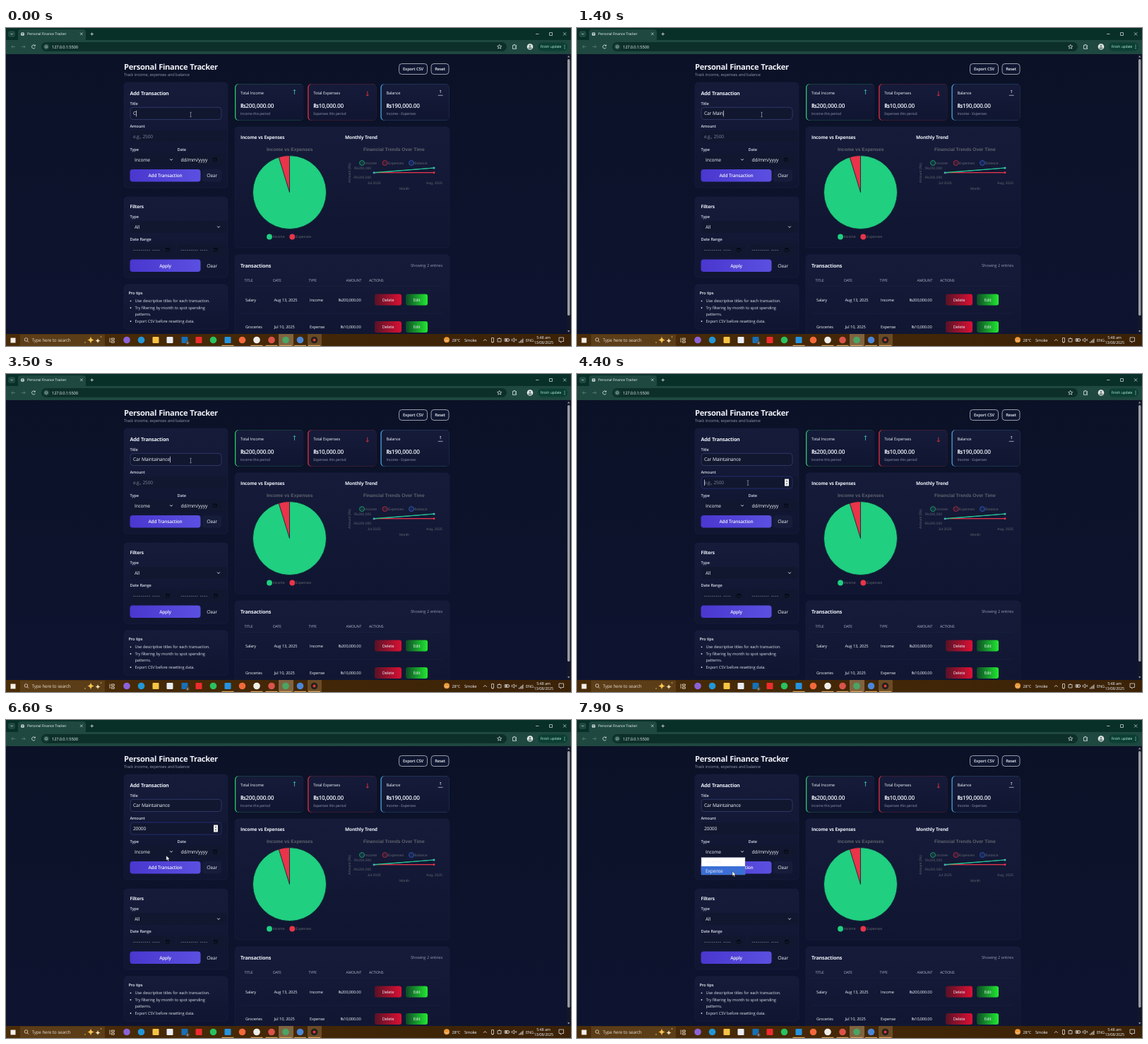
Write an HTML page that moves like this. It is 800 px wide and 450 px high and loops after 8000 ms.

```html
<!DOCTYPE html>
<html lang="en">
<head>
<meta charset="utf-8">
<title>Personal Finance Tracker</title>
<style>
  html, body { margin: 0; width: 100%; height: 100%; overflow: hidden; background: #0d1329; }
  svg { display: block; width: 800px; height: 450px; text-rendering: geometricPrecision; }
  text { font-family: "Open Sans", "Noto Sans", sans-serif; letter-spacing: -.03em; word-spacing: .05em; white-space: pre; }
  .chart text { font-family: "Liberation Sans", Arial, sans-serif; letter-spacing: 0; word-spacing: 0; }
</style>
</head>
<body>
<svg id="stage" viewBox="0 0 800 450" xmlns="http://www.w3.org/2000/svg"></svg>
<script>
const LOOP = 8000;
const WHITE = '#eef0f8', MUTED = '#9298ae', GREY = '#62656f', MINT = '#dce9e6';
const GREEN = '#20cf80', RED = '#e9344a', BLUE = '#3d8fe0';

// Drawing helpers; text is centred vertically on its capitals.
const rect = (x, y, w, h, fill, r = 0, extra = '') =>
  `<rect x="${x}" y="${y}" width="${w}" height="${h}" rx="${r}" fill="${fill}" ${extra}/>`;
const dot = (x, y, r, fill, extra = '') =>
  `<circle cx="${x}" cy="${y}" r="${r}" fill="${fill}" ${extra}/>`;
const path = (d, stroke, w = 0.8, extra = '') =>
  `<path d="${d}" fill="none" stroke="${stroke}" stroke-width="${w}" ${extra}/>`;
const text = (x, y, s, size, fill = WHITE, weight = 400, anchor = 'start', extra = '') =>
  `<text x="${x}" y="${(y + size * 0.357).toFixed(2)}" font-size="${size}" fill="${fill}" ` +
  `font-weight="${weight}" text-anchor="${anchor}" ${extra}>${s}</text>`;
const gradient = (id, from, to, down = 0) =>
  `<linearGradient id="${id}" x2="${1 - down}" y2="${down}"><stop stop-color="${from}"/>` +
  `<stop offset="1" stop-color="${to}"/></linearGradient>`;
const stroke = (c, w = 0.7) => `stroke="${c}" stroke-width="${w}"`;
const panel = (x, y, w, h) => rect(x, y, w, h, 'url(#panel)', 5, stroke('#1a2142', 0.6));
const field = (x, y, w, h) => rect(x, y, w, h, '#11172f', 4);
const chevron = (x, y) => path(`M${x - 1.8} ${y - 1}l1.8 1.9 1.8 -1.9`, WHITE, 0.9);

function browser() {
  let s = rect(0, 0, 800, 18, '#082f28') + rect(0, 17, 800, 20, '#1e4840');
  s += rect(17, 2, 96, 17, '#1e4840', 4);
  s += rect(3, 4, 10, 9, '#1e4840', 3) + path('M6.5 7.6l1.7 1.7 1.7 -1.7', MINT);
  s += dot(23.5, 8.5, 2.6, '#c3d2ce') + path('M21 8h5M23.5 6v5', '#45665e', 0.5);
  s += text(30, 8.5, 'Personal Finance Tracker', 5.05, '#eef5f3', 500);
  s += path('M105 6.5l3.6 3.6M108.6 6.5l-3.6 3.6', MINT, 0.7);
  s += path('M119.5 8.5h4.4M121.7 6.3v4.4', MINT);
  s += path('M750 8.5h4.5M769.5 6.5h4v4h-4zM789 6.3l4.2 4.2M793.2 6.3l-4.2 4.2', MINT, 0.7);
  s += path('M13 26.5h-5M10 24.3l-2.2 2.2 2.2 2.2M22 26.5h5M25 24.3l2.2 2.2 -2.2 2.2', '#5f8078');
  s += path('M41 25a2.5 2.5 0 1 0 .3 2.6M41.3 23.6v1.7h-1.7', MINT);
  s += rect(50, 20, 659, 13, '#0d2f2a', 6.5) + dot(57, 26.5, 4.3, '#1e4840');
  s += dot(57, 26.5, 1.9, 'none', stroke(MINT, 0.6)) + path('M57 26v1.5', MINT, 0.6);
  s += text(65, 26.5, '127.0.0.1:5500', 5.8, '#eef5f3');
  s += path('M698.7 23.4l.9 2 2.2 .2 -1.7 1.4 .6 2.2 -2 -1.2 -2 1.2 .6 -2.2 -1.7 -1.4 2.2 -.2z', MINT, 0.7);
  s += path('M717.5 24.5h1.5v-1h1.5v1h2v2h-1.3v1.2h1.3v1.8h-5z', MINT);
  s += dot(742, 26.5, 4.3, '#e3eae8') + dot(742, 25.3, 1.4, '#6d857e') + rect(739.5, 27.3, 5, 2.5, '#6d857e', 1.2);
  s += rect(753, 20.5, 42, 12, '#0c3f34', 6) + text(756.5, 26.5, 'Finish update', 5, '#b7efd9', 500);
  for (const y of [24.3, 26.5, 28.7]) s += dot(791, y, 0.6, '#b7efd9');
  return s;
}

function forms() {
  let s = text(167, 54.5, 'Personal Finance Tracker', 11.2, WHITE, 700);
  s += text(167, 65.5, 'Track income, expenses and balance', 5.75, MUTED);
  for (const [x, w, name] of [[556.5, 40, 'Export CSV'], [602, 25, 'Reset']])
    s += rect(x, 50.5, w, 15, '#0f1630', 4, stroke('#d5d8e4')) + text(x + w / 2, 58, name, 5.8, WHITE, 600, 'middle');

  s += panel(167, 77, 147, 149) + panel(167, 239, 147, 114) + panel(167, 363, 147, 63);
  s += text(175.5, 92, 'Add Transaction', 7.2, WHITE, 700);
  const labels = [['Title', 175.5, 107], ['Amount', 175.5, 139.3], ['Type', 175.5, 171.5], ['Date', 242.5, 171.5],
    ['Type', 175.5, 267], ['Date Range', 175.5, 299]];
  for (const [name, x, y] of labels) s += text(x, y, name, 5.7, '#d6d9e6', 600);
  s += rect(176, 112.3, 129, 17.2, '#11172f', 4, stroke('#3a447a'));
  s += field(176, 145, 137, 17) + field(176, 177.5, 63, 17) + field(243, 177.5, 70, 17);
  s += text(182, 186.3, 'Income', 6.67, WHITE, 500) + chevron(234, 186.3);
  s += text(247.5, 186.3, 'dd/mm/yyyy', 6.8, WHITE, 500);

  s += text(175.5, 252.8, 'Filters', 6.6, WHITE, 700);
  s += field(176, 273, 137, 17) + text(182, 281.5, 'All', 6.67, WHITE, 500) + chevron(301, 281.5);
  s += field(176, 305, 63, 17) + field(243, 305, 70, 17);
  for (const x of [180, 247.5]) s += text(x, 314, '--------- ----', 6.67, '#b9bdcc', 400, 'start', 'style="letter-spacing:.09em"');
  for (const [x, y] of [[296, 186], [229, 313.5], [297, 313.5]])
    s += rect(x - 2.3, y - 2, 4.6, 4.5, 'none', 0.5, stroke('#04060e', 0.8)) + path(`M${x - 2.3} ${y - 1}h4.6`, '#04060e', 1);

  s += rect(278, 200, 27, 17.5, '#161d3b', 4);
  for (const [y, name] of [[200, 'Add Transaction'], [327.5, 'Apply']]) {
    s += rect(175.5, y, 100, 17.5, 'url(#violet)', 4) + text(225.5, y + 8.9, name, 6.5, WHITE, 600, 'middle');
    s += text(291.5, y + 8.9, 'Clear', 6.5, WHITE, 500, 'middle');
  }

  s += text(173.5, 375, 'Pro tips', 5.7, WHITE, 600);
  const tips = [[386.3, 'Use descriptive titles for each transaction.', 1], [396, 'Try filtering by month to spot spending', 1],
    [405, 'patterns.', 0], [415, 'Export CSV before resetting data.', 1]];
  for (const [y, line, bullet] of tips)
    s += text(182.5, y, line, 5.77, '#d8dbe7') + (bullet ? dot(176.5, y, 0.9, '#d8dbe7') : '');
  return s;
}

function cards() {
  const list = [['Total Income', '₨200,000.00', 'Income this period', '#2ac96f', 324],
    ['Total Expenses', '₨10,000.00', 'Expenses this period', '#e22f40', 427.2],
    ['Balance', '₨190,000.00', 'Income - Expenses', '#4aa3df', 530.4]];
  let s = '';
  for (const [name, sum, note, color, x] of list) {
    s += rect(x, 79.3, 97, 51.5, color, 5) + rect(x + 1.3, 79.3, 96, 51.5, 'url(#panel)', 5);
    s += text(x + 8, 91.7, name, 5.8) + text(x + 8, 109.7, sum, 8.3, WHITE, 600);
    s += text(x + 8, 120.7, note, 5.05, MUTED);
  }
  s += path('M408.5 94v-6.5M406.8 89l1.7 -1.8 1.7 1.8', '#35b8b4', 0.9);
  s += path('M511.8 89.5v6.5M510 94.3l1.8 1.9 1.8 -1.9', '#f0303c', 0.9);
  s += path('M615.2 88v4M614.3 89l.9 -1 .9 1M611.8 95.3h6.8', '#d9dbe6', 0.7);
  return s;
}

function charts() {
  let s = panel(324, 140, 304, 171);
  s += text(332, 154.5, 'Income vs Expenses', 6.6, WHITE, 700) + text(480, 154.5, 'Monthly Trend', 6.6, WHITE, 700);
  s += '<g class="chart">';
  s += text(401.7, 172, 'Income vs Expenses', 6.67, GREY, 700, 'middle');
  const cx = 401.5, cy = 232.5, r = 52, a = 2 * Math.PI * 10 / 210, edge = stroke('#101a30', 0.8);
  s += dot(cx, cy, r, GREEN, edge);
  s += `<path d="M${cx} ${cy}L${cx - r * Math.sin(a)} ${cy - r * Math.cos(a)}A${r} ${r} 0 0 1 ${cx} ${cy - r}z" fill="${RED}" ${edge}/>`;
  s += dot(373, 295.5, 3.9, GREEN) + text(377.5, 295.5, 'Income', 5.2, GREY);
  s += dot(405.3, 295.5, 3.9, RED) + text(410, 295.5, 'Expenses', 5.1, GREY);

  s += text(549.3, 172, 'Financial Trends Over Time', 6.67, GREY, 700, 'middle');
  const legend = [[504, 'Income', '#1c9a68'], [536.5, 'Expenses', '#b02c40'], [574, 'Balance', '#2e58b8']];
  for (const [x, name, color] of legend)
    s += dot(x, 191, 3.5, color, `fill-opacity=".2" ${stroke(color, 0.9)}`) + text(x + 4.3, 191, name, 5.1, GREY);
  s += text(517, 198, '₨200,000', 5, GREY, 400, 'end') + text(517, 211.3, '-₨200,000', 5, GREY, 400, 'end');
  s += path('M520.5 198h86M520.5 204.7h86M520.5 211.3h86M520.5 198v14M606 198v14', '#1a203b', 0.4);
  s += text(521, 219, 'Jul 2025', 5, GREY, 400, 'middle') + text(606.5, 219, 'Aug, 2025', 5, GREY, 400, 'middle');
  s += text(564, 227.6, 'Month', 5, GREY, 400, 'middle');
  s += text(0, 0, 'Amount (₨)', 5, GREY, 400, 'middle', 'transform="translate(486 205) rotate(-90)"');
  s += path('M521 205L606 198', BLUE, 1.2) + path('M521 204.6L606 204.7', RED, 1.2) + path('M521 204.7L606 198', GREEN, 1.2);
  s += dot(606, 204.7, 1.4, RED) + dot(521, 204.8, 1.5, '#45a9c0') + dot(606, 198, 1.5, '#45b9b0');
  return s + '</g>';
}

function table() {
  let s = panel(324, 321, 304, 130);
  s += text(332, 336, 'Transactions', 7.2, WHITE, 700) + text(618, 336, 'Showing 2 entries', 5.75, MUTED, 400, 'end');
  const heads = [['TITLE', 337.5], ['DATE', 378], ['TYPE', 428.5], ['AMOUNT', 481.5], ['ACTIONS', 514]];
  for (const [name, x] of heads) s += text(x, 357, name, 5.2, '#b4b8c9');
  s += path('M332 365.5h286M332 404h286', '#1b2242', 0.5);
  const rows = [[384.7, 'Salary', 'Aug 13, 2025', 'Income', '₨200,000.00'],
    [423.3, 'Groceries', 'Jul 10, 2025', 'Expense', '₨10,000.00']];
  for (const [y, title, date, type, sum] of rows) {
    s += text(339, y, title, 5.7) + text(379.5, y, date, 5.75) + text(430, y, type, 5.7);
    s += text(502.5, y, sum, 5.7, WHITE, 400, 'end');
    s += rect(522, y - 8.3, 38, 16, 'url(#delete)', 3) + text(541, y, 'Delete', 5.8, WHITE, 500, 'middle');
    s += rect(566, y - 8.3, 31, 16, 'url(#edit)', 3) + text(581.5, y, 'Edit', 5.8, WHITE, 500, 'middle');
  }
  return s;
}

function taskbar() {
  let s = rect(793.5, 37, 6.5, 396, '#12162a') + rect(795, 44, 3.5, 363, '#9a9ba3', 1.7);
  s += '<path d="M795 41.5l1.7 -2.5 1.7 2.5zM795 428l1.7 2.5 1.7 -2.5z" fill="#9a9ba3"/>';
  s += rect(0, 433, 800, 17, 'url(#bar)') + rect(6.5, 438.5, 7, 7, '#f3eee8');
  s += rect(20, 433.5, 120, 16.5, '#5b3d18') + dot(28.5, 441, 2.3, 'none', stroke('#e8ddd0', 0.8)) + path('M30.2 442.8l2 2', '#e8ddd0');
  s += text(36.5, 441.7, 'Type here to search', 6.3, '#e8ddd0');
  s += '<path d="M120 436.5q.7 4.3 5 5q-4.3 .7 -5 5q-.7 -4.3 -5 -5q4.3 -.7 5 -5z" fill="#f5c451"/>';
  s += '<path d="M130 439q.5 3 3.5 3.5q-3 .5 -3.5 3.5q-.5 -3 -3.5 -3.5q3 -.5 3.5 -3.5z" fill="#f0ddb0"/>';
  s += dot(112, 445, 0.8, '#f5c451') + dot(134.5, 437, 0.8, '#f5c451');
  s += rect(386, 433, 21, 17, '#80633f') + rect(427, 433, 20, 17, '#6b4b25');
  s += path('M147 438.5v6.5M149.3 439h4v2.2h-4zM149.3 443h4v2.2h-4z', '#f0e7dc');
  const icons = [[171, '#8b62d8', 1], [191.5, '#2196d8', 1], [212, '#f6c445', 0], [232, '#e9edf2', 0], [253, '#1670b8', 0],
    [273, '#ee2c2c', 0], [293.5, '#28c25e', 1], [314, '#2593e0', 0], [334.5, '#f2693a', 1], [355, '#f0eee9', 1],
    [376, '#d9534a', 1], [396, '#4aa564', 1], [416.5, '#4a86d8', 1], [436.5, '#23201f', 1]];
  for (const [x, color, round] of icons)
    s += round ? dot(x, 441.5, 4.8, color) : rect(x - 4.5, 437, 9, 9, color, 1);
  s += dot(436.5, 441.5, 2, '#e13a35') + dot(257, 445.5, 2.7, '#574b42') + text(257, 445.5, '6', 4, WHITE, 400, 'middle');
  for (const x of [314, 355, 376, 396, 416.5, 436.5]) s += rect(x - 8.5, 448.8, 17, 1.2, '#d9a65b');
  s += dot(624, 441.3, 4, '#ee9a3a') + path('M621.5 442.5h5', '#d8d4cc', 0.8);
  s += text(631.5, 441.5, '28°C', 5.6) + text(649, 441.5, 'Smoke', 5.8);
  s += path('M676 442.8l2.3 -2.3 2.3 2.3', WHITE);
  s += path('M687.5 438.5h3v6h-3zM689 444.5v1.5', WHITE, 0.7);
  s += path('M696 439.5h5v4.5h-5zM698.5 438v1.5', WHITE, 0.7);
  s += rect(706, 439.5, 6, 4, 'none', 0.6, stroke(WHITE)) + rect(707, 440.5, 3, 2, WHITE) + rect(712.3, 440.5, 0.8, 2, WHITE);
  s += path('M716 440.5h1.5l2 -1.7v5.5l-2 -1.7h-1.5zM720.7 440l2.4 2.8M723.1 440l-2.4 2.8', WHITE, 0.6);
  s += path('M726.5 445.5v-1.5M728.3 445.5v-3M730.1 445.5v-4.5M731.9 445.5v-6', WHITE, 0.9);
  s += text(736, 441.5, 'ENG', 5.6) + text(761, 437.6, '5:48 am', 5.5, WHITE, 400, 'middle');
  s += text(761.3, 445.5, '13/08/2025', 5.5, WHITE, 400, 'middle');
  return s + path('M783 438h6.5v5.5h-2.5l-1.5 1.7v-1.7h-2.5z', WHITE, 0.7);
}

const moving = `
  <text id="title" x="180" y="123.4" font-size="6.71" fill="${WHITE}"></text>
  <g id="focus">
    ${rect(176, 145, 129, 17, '#11172f', 4, stroke('#2a3488', 0.7))}
    ${rect(294, 148.5, 6, 10, '#f2f2f2')}
    <path d="M295.7 152.3l1.3 -1.7 1.3 1.7zM295.7 154.8l1.3 1.7 1.3 -1.7z" fill="#444"/>
  </g>
  <text id="amount" x="180" y="156.2" font-size="6.67"></text>
  ${rect(0, 0, 0.7, 8.5, WHITE, 0, 'id="caret"')}
  <g id="menu">
    ${rect(176, 194.5, 62, 24.5, '#fff', 0, stroke('#8a8fa8', 0.4))}
    ${rect(176, 207, 62, 12, '#3b6fd6', 0, 'id="pick"')}
    ${text(182, 200.8, 'Income', 6.67, '#eceef5')}${text(182, 213.3, 'Expense', 6.67, '#eceef5')}
  </g>
  <g id="beam">${path('M-1.2 -3.2h2.4M0 -3.2v6.4M-1.2 3.2h2.4', '#b4b8c8', 0.6)}</g>
  <g id="arrow"><path d="M0 0v6.8l1.6 -1.5 1.1 2.5 1.2 -.5 -1.1 -2.4h2.2z" fill="#fff" ${stroke('#111', 0.4)}/></g>`;

const stage = document.getElementById('stage');
stage.innerHTML = '<defs>' + gradient('page', '#0b1126', '#0e1430', 1) + gradient('panel', '#151b39', '#101631', 1) +
  gradient('violet', '#4a37cf', '#5a50e0') + gradient('delete', '#571226', '#dc1034') +
  gradient('edit', '#0d4a26', '#22e832') + gradient('bar', '#4a2c08', '#3b2207') + '</defs>' +
  rect(0, 36, 800, 414, 'url(#page)') + browser() + forms() + cards() + charts() + table() + taskbar() + moving;

const el = Object.fromEntries(['title', 'amount', 'focus', 'caret', 'menu', 'pick', 'beam', 'arrow']
  .map(id => [id, document.getElementById(id)]));

const TITLE = 'Car Maintainance', AMOUNT = '20000';
const titleKeys = [0, 200, 400, 600, 800, 1000, 1150, 1300, 1700, 1900, 2200, 2400, 2800, 3000, 3150, 3300];
const amountKeys = [4800, 5000, 5200, 5500, 5700];
const CLICK = 4400, OPEN = 7200, HOVER = 7500;
const mouse = [[0, 261.5, 122.5], [3600, 261.5, 122.5], [4200, 242, 154], [5900, 242, 154],
  [6500, 227, 192], [7000, 226, 191], [7300, 224, 197], [7700, 220, 214], [LOOP, 220, 214]];

const show = (node, on) => { node.style.display = on ? '' : 'none'; };

function mouseAt(t) {
  const i = mouse.findIndex(p => p[0] > t);
  const [t0, x0, y0] = mouse[i - 1], [t1, x1, y1] = mouse[i];
  const u = (t - t0) / (t1 - t0), k = u * u * (3 - 2 * u);
  return [x0 + (x1 - x0) * k, y0 + (y1 - y0) * k];
}

function draw(time) {
  const t = time % LOOP;
  const typed = keys => keys.filter(k => k <= t).length;
  const amount = AMOUNT.slice(0, typed(amountKeys));
  el.title.textContent = TITLE.slice(0, typed(titleKeys));
  el.amount.textContent = amount || 'e.g., 2500';
  el.amount.setAttribute('fill', amount ? WHITE : '#7d8399');

  const inAmount = t >= CLICK, open = t >= OPEN;
  show(el.focus, inAmount && !open);
  show(el.menu, open);
  el.pick.setAttribute('y', t >= HOVER ? 207 : 194.5);

  // The caret restarts its blink at each key press or click.
  const last = Math.max(...[...titleKeys, CLICK, ...amountKeys].filter(k => k <= t));
  const line = inAmount ? el.amount : el.title;
  const width = inAmount && !amount ? 0 : line.getComputedTextLength();
  show(el.caret, !open && (t - last) % 1000 < 500);
  el.caret.setAttribute('x', 180.2 + width);
  el.caret.setAttribute('y', inAmount ? 149.5 : 116.8);

  const [x, y] = mouseAt(t);
  const beam = y < 130 || (y > 145 && y < 162);
  show(el.beam, beam);
  show(el.arrow, !beam);
  (beam ? el.beam : el.arrow).setAttribute('transform', `translate(${x} ${y})`);
}

const start = performance.now();
function tick() {
  draw(performance.now() - start);
  requestAnimationFrame(tick);
}
tick();
</script>
</body>
</html>
```
